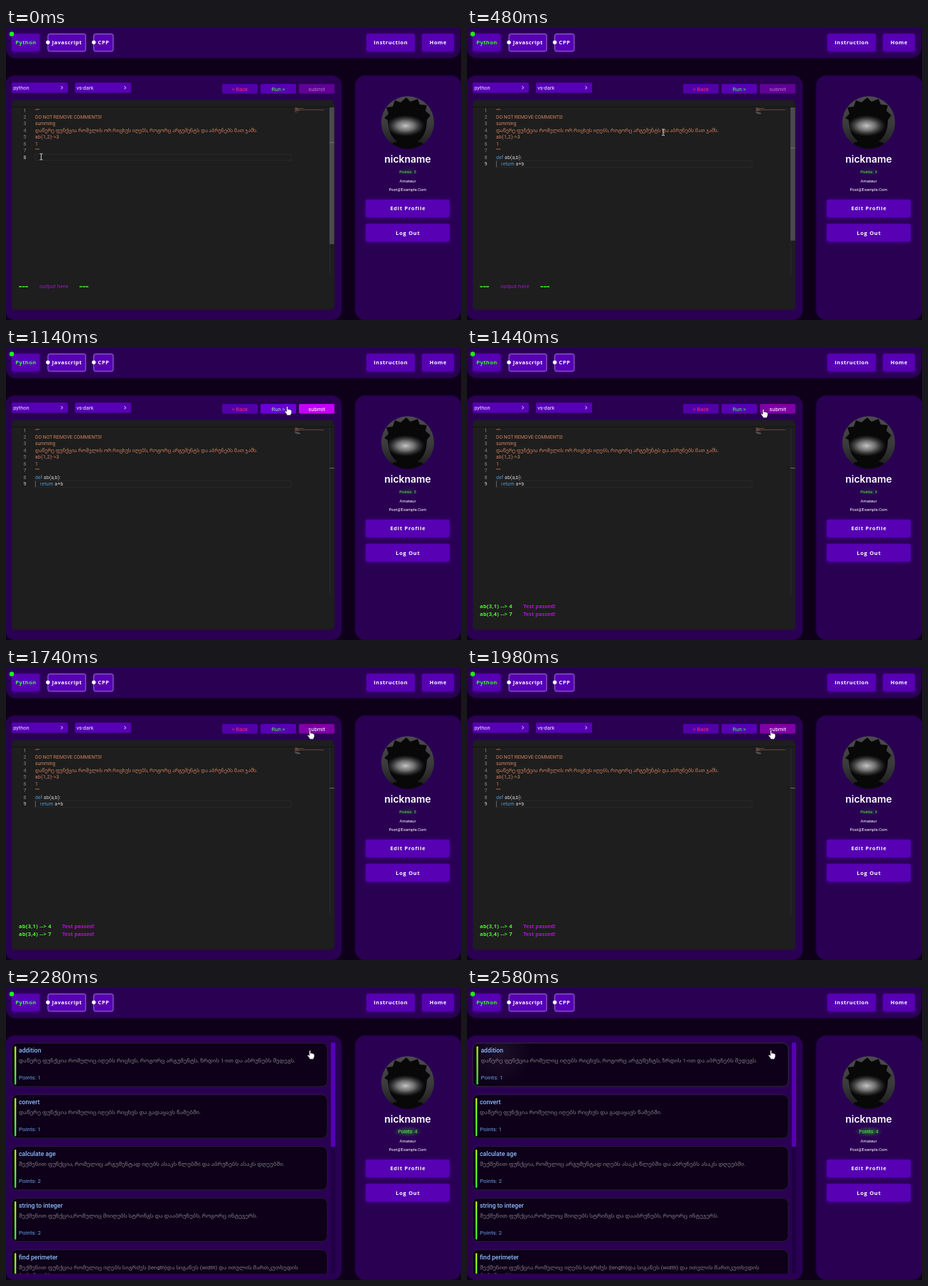
An HTML page for the animation above (2.64 s loop, 640 px wide and 412 px high).

```html
<!DOCTYPE html>
<html lang="en">
<head>
<meta charset="utf-8">
<title>Coding tasks</title>
<style>
  html, body { margin: 0; width: 100%; height: 100%; overflow: hidden; background: #0d0018; }
  svg { display: block; width: 640px; height: 412px; }
  text { font-family: Roboto, "Noto Sans", "Noto Sans Georgian", "DejaVu Sans", sans-serif; white-space: pre; }
  text[font-weight="700"] { font-family: "Open Sans", "Noto Sans", sans-serif; }
  text[font-weight="600"] { font-family: Inter, "Open Sans", sans-serif; }
  .glow { filter: drop-shadow(0 1px 2.5px #5000acc0); }
  .soft { filter: drop-shadow(0 0 1px #2a0053); }
</style>
</head>
<body>
<svg id="stage" viewBox="0 0 640 412" xmlns="http://www.w3.org/2000/svg">
  <defs>
    <linearGradient id="bar" x1="0" y1="0" x2="0" y2="1">
      <stop offset="0" stop-color="#b4f400"/><stop offset="1" stop-color="#34e834"/>
    </linearGradient>
    <linearGradient id="photo" x1="0" y1="0" x2="0" y2="1">
      <stop offset="0" stop-color="#4c4c4e"/><stop offset=".55" stop-color="#39393b"/><stop offset="1" stop-color="#171718"/>
    </linearGradient>
    <radialGradient id="light">
      <stop offset="0" stop-color="#e4e4e4" stop-opacity=".85"/><stop offset=".45" stop-color="#bbb" stop-opacity=".6"/>
      <stop offset="1" stop-color="#777" stop-opacity="0"/>
    </radialGradient>
    <radialGradient id="sheen" gradientUnits="userSpaceOnUse" cx="46" cy="92" r="46">
      <stop offset="0" stop-color="#8a7a98" stop-opacity=".13"/><stop offset="1" stop-color="#8a7a98" stop-opacity="0"/>
    </radialGradient>
    <radialGradient id="halo">
      <stop offset="0" stop-color="#20c020" stop-opacity=".5"/><stop offset="1" stop-color="#20c020" stop-opacity="0"/>
    </radialGradient>
    <clipPath id="disc"><circle cx="565" cy="133.5" r="37.2"/></clipPath>
    <clipPath id="listBox"><rect x="0" y="76" width="466" height="327"/></clipPath>
  </defs>
</svg>
<script>
const LOOP = 2640, STEP = 60;
const TYPE_START = 60, TYPE_END = 360, RUN = 840, RESULT = 1320, SCORED = 2100, LIST = 2280;
const PANEL = '#2a0053', BTN = '#5700b4', BOLD = 700;
const stage = document.getElementById('stage');

function add(parent, tag, attrs) {
  const node = document.createElementNS('http://www.w3.org/2000/svg', tag);
  for (const k in attrs) node.setAttribute(k, attrs[k]);
  parent.appendChild(node);
  return node;
}
const group = (parent, attrs = {}) => add(parent, 'g', attrs);
const rect = (p, x, y, width, height, fill, rx = 0, more = {}) =>
  add(p, 'rect', { x, y, width, height, fill, rx, ...more });
const circle = (p, cx, cy, r, fill) => add(p, 'circle', { cx, cy, r, fill });
function text(p, x, y, str, size, fill, weight = 400, gap = 0, anchor = 'start') {
  const node = add(p, 'text', { x, y, fill, 'font-size': size, 'font-weight': weight,
    'letter-spacing': gap, 'text-anchor': anchor });
  node.textContent = str;
  return node;
}
const show = (node, on) => node.setAttribute('display', on ? 'inline' : 'none');
const clamp = v => Math.max(0, Math.min(1, v));
const span = (t, a, b) => clamp((t - a) / (b - a));

// Panels
rect(stage, 0, 0, 640, 412, '#0d0018');
rect(stage, 0, -20, 639, 62.3, PANEL, 14, { class: 'soft' });
rect(stage, -1, 67.3, 473, 344.5, PANEL, 14, { class: 'soft' });
rect(stage, 491.3, 67.3, 148.7, 344.5, PANEL, 14, { class: 'soft' });

// Navigation
function navButton(x, w, y, label, color, gap) {
  rect(stage, x, y, w, 25, BTN, 2.5, { class: 'glow' });
  return text(stage, x + w / 2 + gap / 2, y + 15.3, label, 7.5, color, BOLD, gap, 'middle');
}
navButton(8, 39.5, 8, 'Python', '#35ff2a', .45);
navButton(59, 53, 8, 'Javascript', '#fff', .5);
navButton(123.5, 27, 8, 'CPP', '#fff', .7);
navButton(507, 68, 8, 'instruction', '#fff', .6);
navButton(585, 45, 8, 'Home', '#fff', .5);
for (const [x, w] of [[59, 53], [123.5, 27.3]]) {
  rect(stage, x, 8.4, w, 24.4, 'none', 2.5, { stroke: '#c8b4e4', 'stroke-width': .65 });
  circle(stage, x, 20.3, 2.7, '#fff');
}
circle(stage, 8, 8.5, 3.2, '#1cff08');

// Profile
const photo = group(stage, { 'clip-path': 'url(#disc)' });
rect(photo, 527, 96, 76, 76, 'url(#photo)');
add(photo, 'path', { fill: '#080809',
  d: 'M534 174Q538 163 550 160Q537 150 537 130L532 127L538 121L535 112L544 111L547 102L555 105L563 98L569 104L579 100L582 108L592 109L590 117L597 123L592 130Q592 151 579 160Q592 163 597 174Z' });
add(photo, 'ellipse', { cx: 562, cy: 138, rx: 27, ry: 15, fill: 'url(#light)' });
text(stage, 565, 190.3, 'nickname', 13.9, '#fff', 600, 0, 'middle');
const halo = add(stage, 'ellipse', { cx: 565, cy: 202.5, rx: 21, ry: 8, fill: 'url(#halo)' });
const points = text(stage, 565, 204.7, '', 6, '#55f03c', 400, 0, 'middle');
text(stage, 565, 217.7, 'Amateur', 6, '#fff', 400, 0, 'middle');
text(stage, 565, 230.4, 'Post@Example.Com', 5.8, '#fff', 400, 0, 'middle');
navButton(506, 118, 242, 'Edit Profile', '#fff', .75);
navButton(506, 118, 276.3, 'Log Out', '#fff', .7);

// Editor page
const editor = group(stage);
for (const [x, label] of [[8, 'python'], [97, 'vs-dark']]) {
  rect(editor, x, 77, 79, 14.5, BTN, 2);
  text(editor, x + 2.2, 86.9, label, 7.4, '#f0e8fa');
  add(editor, 'path', { d: `M${x + 69.5} 82l2 2.2l-2 2.2`, fill: 'none', stroke: '#fff', 'stroke-width': .9 });
}
function toolButton(x, label, fill, color) {
  const box = rect(editor, x, 79, 50, 13.5, fill, 2);
  return { box, label: text(editor, x + 25, 88.7, label, 7.6, color, 400, 0, 'middle') };
}
toolButton(304, '< Back', '#5200a8', '#ff2868');
const run = toolButton(358, 'Run >', BTN, '#3cff3c');
const submit = toolButton(412, 'submit', '#610096', '#b070c4');
function paint(button, fill, color) {
  button.box.setAttribute('fill', fill);
  button.label.setAttribute('fill', color);
}

rect(editor, 8, 101.5, 454, 296, '#1e1e1e', 5);
rect(editor, 8, 110.8, 454, 1, '#141414');
rect(editor, 455, 112, .7, 236, '#303030');
const ROW = 9.43, CODE = 6.8, baseline = i => 118.5 + i * ROW;
const current = rect(editor, 41, 0, 360, 8.6, 'none', 0, { stroke: '#2b2b2b', 'stroke-width': .9 });
const numbers = Array.from({ length: 9 }, (_, i) =>
  text(editor, 28.5, baseline(i), i + 1, 7, '#858585', 400, 0, 'end'));
const comment = [
  '"""', 'DO NOT REMOVE COMMENTS!', 'summing',
  'დაწერე ფუნქცია რომელის ორ რიცხვს იღებს, როგორც არგუმენტს და აბრუნებს მათ ჯამს.',
  'ab(1,2)->3', '1', '"""'
];
comment.forEach((str, i) =>
  text(editor, 41, baseline(i), str, CODE, '#d0825e', 400, str.includes('(') ? .36 : 0));

function codeLine(x, row, key, rest) {
  const line = text(editor, x, baseline(row), '', CODE, '#d4d4d4', 400, .15);
  const head = add(line, 'tspan', { fill: '#569cd6' }), tail = add(line, 'tspan', {});
  return n => {
    head.textContent = key.slice(0, n);
    tail.textContent = rest.slice(0, Math.max(0, n - key.length));
  };
}
const typeDef = codeLine(41, 7, 'def', ' ab(a,b):');
const typeReturn = codeLine(48, 8, 'return', ' a+b');
const indent = rect(editor, 41.2, 187.6, .8, 8.6, '#707070');

// Minimap
[3, 12, 5, 41, 6, 1, 3].forEach((w, i) => rect(editor, 406.5, 112.4 + i * .95, w, .6, '#8a6250'));
const miniDef = rect(editor, 406.5, 119.4, 6, .7, '#688494');
const miniReturn = rect(editor, 408.5, 120.5, 5.5, .7, '#688494');
const slider = rect(editor, 455, 112, 6.6, 193, '#4b4b4b');
const mark = rect(editor, 455, 0, 6.6, .9, '#777');

const hint = group(editor);
text(hint, 18, 367, '===', 7.7, '#46f02c', BOLD);
text(hint, 47, 367, 'output here', 8, '#9c14c4');
text(hint, 103, 367, '===', 7.7, '#46f02c', BOLD);
const result = group(editor);
['ab(3,1) --> 4', 'ab(3,4) --> 7'].forEach((str, i) => {
  text(result, 18, 367 + i * 11, str, 7.5, '#46ff28', BOLD, .27);
  text(result, 79, 367 + i * 11, 'Test passed!', 7.5, '#b010dc', BOLD);
});

// Task list page
const list = group(stage);
const cards = group(list, { 'clip-path': 'url(#listBox)' });
const tasks = [
  ['addition', 1, 'დაწერე ფუნქცია რომელიც იღებს რიცხვს, როგორც არგუმენტს, ზრდის 1-ით და აბრუნებს შედეგს.'],
  ['convert', 1, 'დაწერე ფუნქცია რომელიც იღებს რიცხვს და გადაყავს წამებში.'],
  ['calculate age', 2, 'შექმენით ფუნქცია, რომელიც არგუმენტად იღებს ასაკს წლებში და აბრუნებს ასაკს დღეებში.'],
  ['string to integer', 2, 'შექმენით ფუნქცია,რომელიც მიიღებს სტრინგს და დააბრუნებს, როგორც ინტეჯერს.'],
  ['find perimeter', 2, 'შექმენით ფუნქცია რომელიც იღებს სიგრძეს (length)და სიგანეს (width) და ითვლის მართკუთხედის']
];
let hovered, sheen, edge;
tasks.forEach(([title, score, about], i) => {
  const y = 77.8 + i * 72.9;
  const box = rect(cards, 8, y, 444, 61.2, '#0d0018', 8, { stroke: '#25222c', 'stroke-width': .9 });
  if (!i) {
    edge = box;
    sheen = rect(cards, 8, y, 444, 61.2, 'url(#sheen)', 8);
  }
  const body = group(cards);
  if (!i) hovered = body;
  rect(body, 12, y + 4.5, 2.3, 54, 'url(#bar)', 1);
  text(body, 18, y + 13.5, title, 8.7, '#8cbcff', 500);
  text(body, 18, y + 27.3, about, 7.8, '#858089');
  if (i < 4) text(body, 18, y + 51.3, 'Points: ' + score, 8, '#6c9ee6');
  else text(body, 18, y + 38.5, 'პერიმეტრს.', 7.8, '#858089');
});
rect(list, 457, 77, 6, 326, '#200044');
rect(list, 457, 77, 6, 147, BTN);

// Pointer: time, x, y of the hotspot
const path = [[0, 49.5, 181.5], [360, 49.5, 181.5], [480, 276, 147], [660, 395.5, 82.5],
  [1320, 395.5, 82.5], [1500, 427.5, 88], [LOOP, 427.5, 88]];
const beam = add(stage, 'path', { d: 'M-2-4.2h1.5l.5.6l.5-.6h1.5M0-3.6v7.4M-2 4.4h1.5l.5-.6l.5.6h1.5',
  fill: 'none', stroke: '#e4e4e4', 'stroke-width': .9 });
const arrow = add(stage, 'path', { d: 'M0 0v10l2.4-2.2l1.6 3.6l1.6-.7l-1.6-3.5h3.3Z',
  fill: '#fff', stroke: '#000', 'stroke-width': .6 });
const hand = add(stage, 'path', { fill: '#fff', stroke: '#16001f', 'stroke-width': .6, 'stroke-linejoin': 'round',
  d: 'M-1 1Q-1 0 0 0T1 1V4.2Q2.8 3.4 3.6 4.4Q4.6 4 5 5Q6.4 4.8 6.3 6.4V8.4Q6.2 10 5.2 11V12.4H-.6V11.2L-3.4 7.4Q-3.6 6-2.2 6.3L-1 7.4Z' });

function pointerAt(t) {
  const k = Math.max(1, path.findIndex(p => p[0] > t));
  const [a, x, y] = path[k - 1], [b, u, v] = path[k];
  const s = span(t, a, b);
  return [x + (u - x) * s, y + (v - y) * s];
}

function draw(t) {
  const onList = t >= LIST;
  show(editor, !onList);
  show(list, onList);

  const typed = Math.round(22 * span(t, TYPE_START, TYPE_END));
  const second = typed > 12, row = second ? 8 : 7;
  typeDef(Math.min(12, typed));
  typeReturn(Math.max(0, typed - 12));
  show(indent, second);
  show(miniDef, typed > 3);
  show(miniReturn, second);
  show(numbers[8], second);
  numbers.forEach((n, i) => n.setAttribute('fill', i === row ? '#d0d0d0' : '#858585'));
  current.setAttribute('y', 112.1 + row * ROW);
  mark.setAttribute('y', second ? 169 : 161.3);
  slider.setAttribute('height', second ? 188 : 193);

  const [x, y] = pointerAt(t);
  const inCode = y > 112 && !onList;
  const onBar = y >= 79 && y <= 92.5;
  const onRun = onBar && x >= 358 && x <= 408;
  const onSubmit = onBar && x >= 412 && x <= 462;
  show(slider, inCode);
  show(beam, inCode);
  show(hand, onList || onRun || onSubmit);
  show(arrow, !inCode && !onList && !onRun && !onSubmit);
  for (const p of [beam, arrow, hand]) p.setAttribute('transform', `translate(${x} ${y})`);

  paint(run, onRun ? '#6a00d6' : BTN, onRun ? '#8cf0a0' : '#3cff3c');
  if (t < RUN) paint(submit, '#610096', '#b070c4');
  else paint(submit, onSubmit ? '#8000a6' : '#c400fa', '#fff');
  show(hint, t < RUN);
  show(result, t >= RESULT);

  const grow = span(t, SCORED, SCORED + 120);
  points.textContent = 'Points: ' + (t < SCORED ? 3 : 4);
  points.setAttribute('font-size', 6.1 + grow);
  halo.setAttribute('opacity', .3 + .7 * grow);
  halo.setAttribute('rx', 16 + 5 * grow);

  const hover = span(t, LIST, LIST + 240);
  hovered.setAttribute('transform', `translate(${1.4 * hover} 0)`);
  sheen.setAttribute('opacity', hover);
  edge.setAttribute('stroke', hover > .5 ? '#36333e' : '#25222c');
}

const start = performance.now();
function tick(now) {
  const t = Math.max(0, now - start) % LOOP;
  draw(Math.floor(t / STEP) * STEP);
  requestAnimationFrame(tick);
}
draw(0);
requestAnimationFrame(tick);
</script>
</body>
</html>
```
